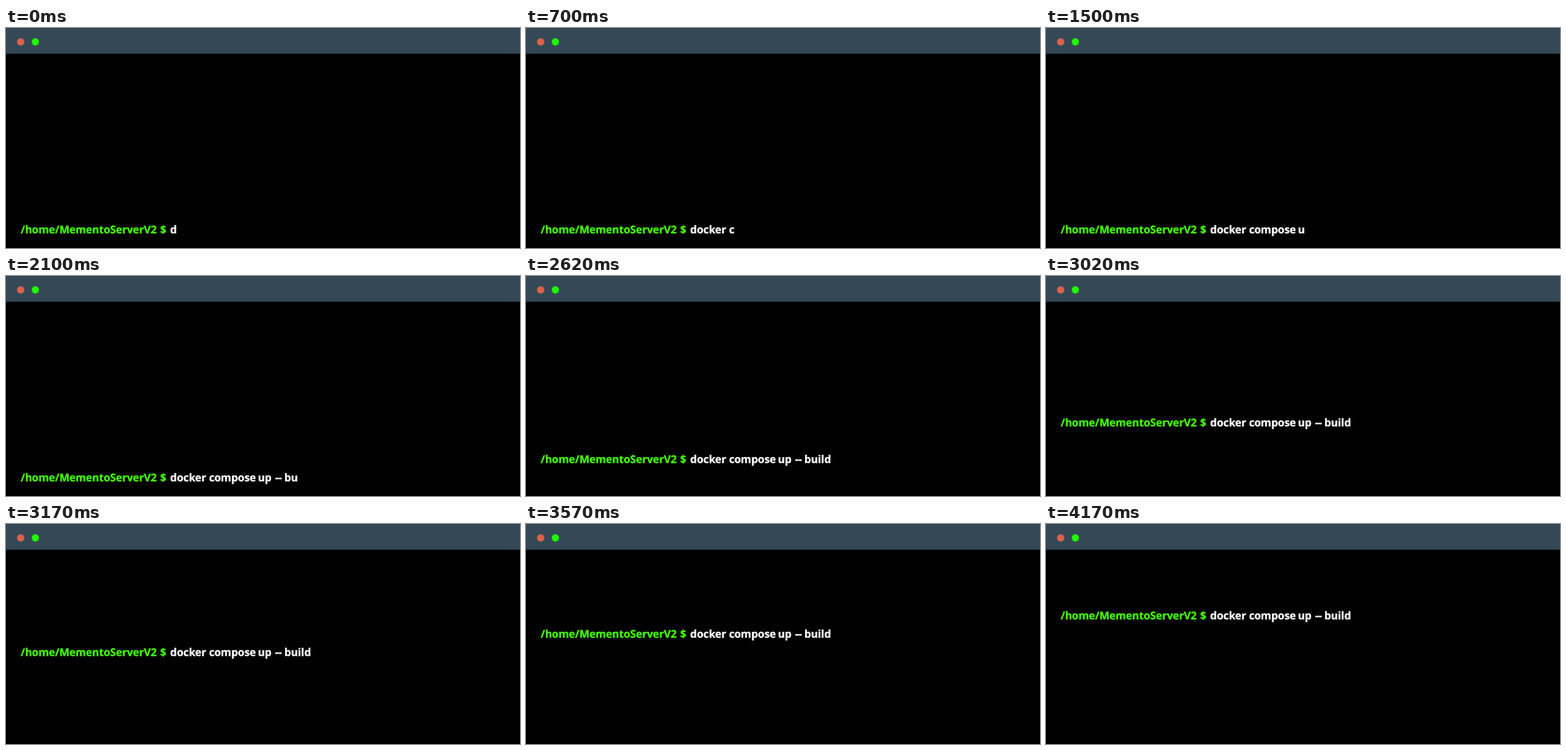
Write an HTML page that moves like this. It is 700x300 px and loops after 5.72 s.

```html
<!DOCTYPE html>
<html lang="en">
<head>
<meta charset="utf-8">
<title>Terminal</title>
<style>
  html, body { margin: 0; width: 100%; height: 100%; overflow: hidden; background: #000; }
  svg { display: block; width: 700px; height: 300px; }
  text {
    font: 700 14.5px "Open Sans", "Noto Sans", sans-serif;
    letter-spacing: -0.1px;
    white-space: pre;
    text-rendering: geometricPrecision;
    fill: #fff;
    stroke: #fff;
    stroke-width: 0.3px;
  }
  .prompt { fill: #44ff00; stroke: #44ff00; }
</style>
</head>
<body>
<svg viewBox="0 0 700 300">
  <rect width="700" height="300" fill="#000"/>
  <rect width="700" height="35" fill="#344856"/>
  <circle cx="20" cy="19" r="5" fill="#dd614a"/>
  <circle cx="40" cy="19" r="5" fill="#1eff00"/>
  <g id="line">
    <text class="prompt" x="20" y="280">/home/MementoServerV2</text>
    <text class="prompt" x="210" y="280">$</text>
  </g>
</svg>
<script>
  const LOOP = 5720;
  const KEY_DELAY = 100;
  const BASELINE = 280;
  const LINE_STEP = 25;
  const SCROLL_TIMES = [2620, 2920, 3020, 3170, 3570, 4170];
  const WORDS = [
    { text: "docker ", x: 223.6 },
    { text: "compose ", x: 276.4 },
    { text: "up ", x: 343 },
    { text: "--", x: 366.5 },
    { text: "build", x: 379 }
  ];

  const line = document.getElementById("line");
  let length = 0;
  for (const word of WORDS) {
    word.start = length;
    length += word.text.length;
    word.node = document.createElementNS("http://www.w3.org/2000/svg", "text");
    word.node.setAttribute("x", word.x);
    word.node.setAttribute("y", BASELINE);
    line.append(word.node);
  }

  const start = performance.now();

  function draw(now) {
    const t = Math.max(0, now - start) % LOOP;
    const typed = Math.floor(t / KEY_DELAY) + 1;
    for (const { text, start, node } of WORDS) {
      node.textContent = text.slice(0, Math.max(0, typed - start));
    }
    const scrolled = SCROLL_TIMES.filter(time => t >= time).length;
    line.setAttribute("transform", `translate(0 ${-scrolled * LINE_STEP})`);
    requestAnimationFrame(draw);
  }

  draw(start);
</script>
</body>
</html>
```
